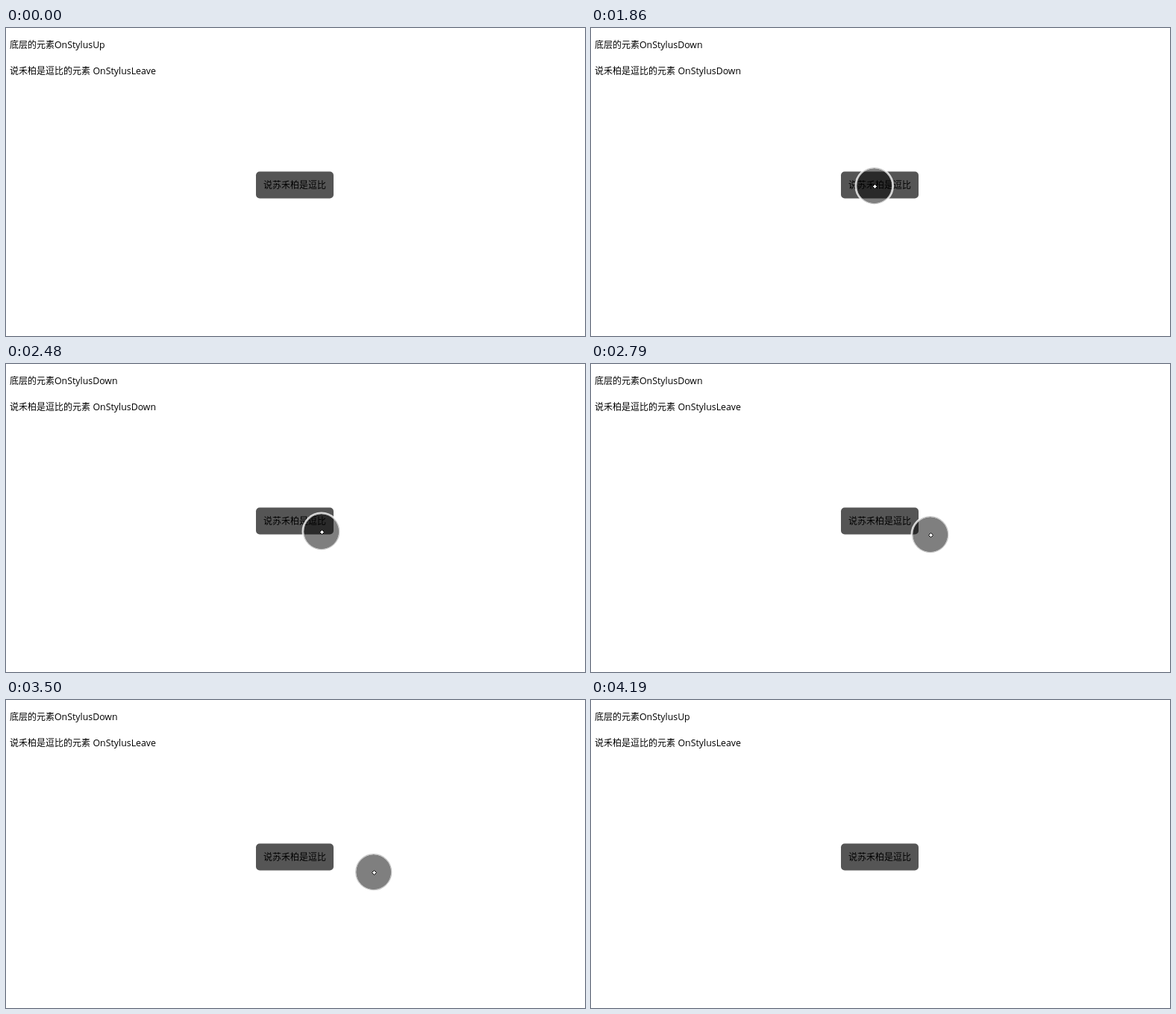
Animation of 776 by 413 pixels, one loop 5.51 s. Source, as an HTML page:

```html
<!DOCTYPE html>
<html lang="zh-CN">
<head>
<meta charset="utf-8">
<style>
  html, body { margin: 0; width: 100%; height: 100%; overflow: hidden; background: #fff; }
  svg { display: block; }
  text { font: 12px "Noto Sans CJK SC", "Noto Sans CJK", sans-serif; }
  .latin { font: 12.35px "Open Sans", "Noto Sans", sans-serif; }
</style>
</head>
<body>
<svg width="776" height="413" viewBox="0 0 776 413">
  <text x="5" y="27">底层的元素</text>
  <text class="latin" id="base" x="65" y="27"></text>
  <text x="5" y="62">说禾柏是逗比的元素</text>
  <text class="latin" id="item" x="116.5" y="62"></text>

  <rect x="335" y="192.6" width="104" height="35.8" rx="5" fill="#555"/>
  <text x="345" y="215">说苏禾柏是逗比</text>

  <g id="hold" fill="#fff" stroke-width="2">
    <rect id="outer" x="332" y="164" width="88" height="88" fill-opacity=".16" stroke="#a5a5a5"/>
    <rect x="347" y="179" width="58" height="58" fill-opacity=".17" stroke="#b2b2b2"/>
  </g>

  <g id="touch">
    <g id="disc" transform="translate(-.8 -.8)">
      <circle r="23.6" fill-opacity=".5"/>
      <circle r="25" fill="none" stroke="#fff" stroke-opacity=".8" stroke-width="2.4"/>
      <circle r="24" fill="none" stroke="#c0c0c0" stroke-opacity=".9" stroke-width="1.2"/>
    </g>
    <path id="tip" d="M0-3L3 0L0 3L-3 0Z" fill="#fff" stroke="#000"/>
  </g>
</svg>
<script>
const LOOP = 5510, DOWN = 1460, UP = 4040, STEP = 2350 / 30;
const $ = id => document.getElementById(id);
const [base, item, hold, outer, touch, disc, tip] =
  ["base", "item", "hold", "outer", "touch", "disc", "tip"].map($);

// Finger path: step, x, y
const path = [
  [1, 376.5, 208.5], [4, 378.5, 210.5], [7, 384.5, 215.5], [9, 392.5, 218.5],
  [14, 431.5, 227.5], [17, 455.5, 229.5], [22, 483.5, 230.5], [30, 503.5, 232.5]
];
const holdFade = { 8: .6, 9: 1, 10: .6, 11: .25 };

function fingerAt(step) {
  const i = path.findIndex(p => p[0] >= step);
  if (i < 0) return path[path.length - 1].slice(1);
  if (i === 0) return path[0].slice(1);
  const [a, b] = [path[i - 1], path[i]];
  const k = (step - a[0]) / (b[0] - a[0]);
  return [1, 2].map(j => Math.floor(a[j] + (b[j] - a[j]) * k) + .5);
}

function draw(t) {
  const step = Math.floor((t - DOWN + 8) / STEP);
  const released = t >= UP;
  base.textContent = "OnStylus" + (t >= DOWN && !released ? "Down" : "Up");
  item.textContent = "OnStylus" + (step >= 1 && step < 15 ? "Down" : "Leave");

  hold.setAttribute("opacity", holdFade[step] || 0);
  outer.setAttribute("opacity", step > 8 ? 1 : 0);

  const fade = released ? Math.max(0, 2 - Math.floor((t - UP) / 75)) / 3 : 1;
  touch.setAttribute("opacity", step >= 1 ? fade : 0);
  disc.setAttribute("opacity", step >= 8 && step <= 10 ? 0 : 1);
  tip.setAttribute("opacity", released ? 0 : 1);
  touch.setAttribute("transform", `translate(${fingerAt(step)})`);
}

const start = performance.now();
function tick() {
  draw((performance.now() - start) % LOOP);
  requestAnimationFrame(tick);
}
tick();
</script>
</body>
</html>
```
